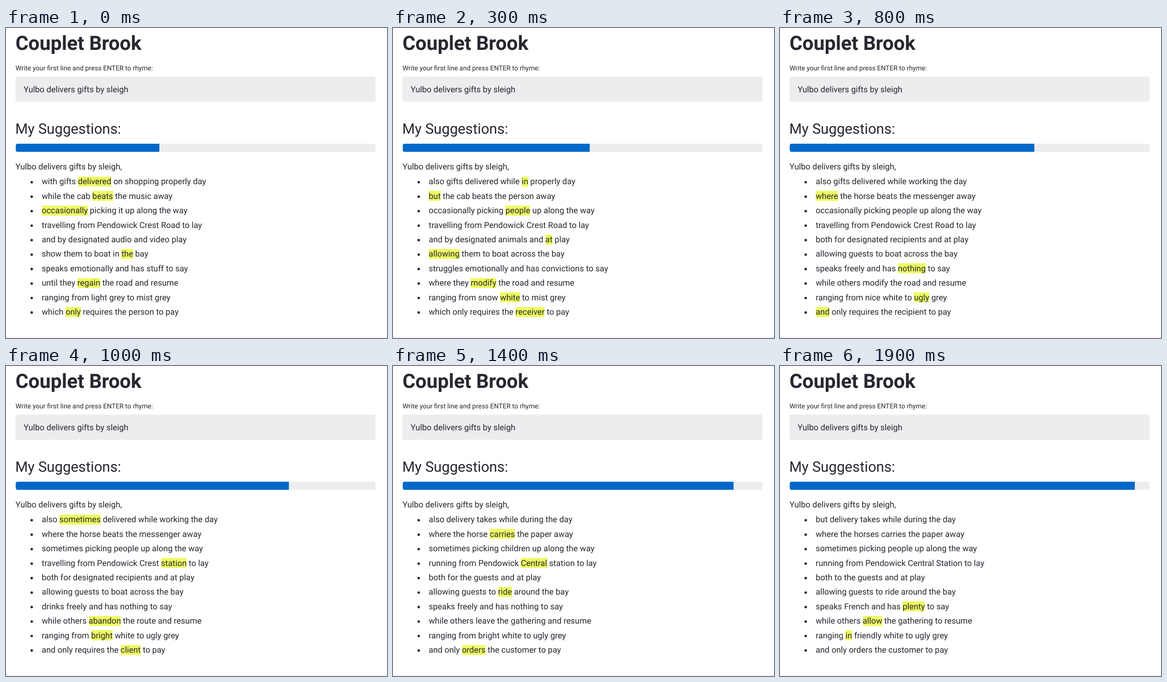
An HTML page for the animation above (2000 ms loop, 800 px wide and 651 px high).

```html
<!DOCTYPE html>
<html lang="en">
<head>
<meta charset="utf-8">
<title>Couplet Brook</title>
<style>
  html, body { margin: 0; width: 100%; height: 100%; overflow: hidden; background: #fff; }
  svg { display: block; width: 100vw; height: 100vh; }
  text { font: 17.45px Roboto, "Noto Sans", sans-serif; fill: #262730; text-rendering: geometricPrecision; }
  .title { font-size: 41.4px; font-weight: 700; }
  .label { font-size: 14px; }
  .heading { font-size: 30.2px; }
  .panel { fill: #ecedee; }
  .mark { fill: #eefc62; }
  .mark, #bar { shape-rendering: crispEdges; }
  .dot { fill: #262730; }
</style>
</head>
<body>
<svg viewBox="0 0 800 651">
  <text class="title" x="20" y="46">Couplet Brook</text>
  <text class="label" x="20" y="89">Write your first line and press ENTER to rhyme:</text>
  <rect class="panel" x="20" y="102" width="756" height="53" rx="4"/>
  <text x="37" y="134.5">Yulbo delivers gifts by sleigh</text>
  <text class="heading" x="19.5" y="222">My Suggestions:</text>
  <clipPath id="track"><rect x="20.5" y="243" width="755.5" height="17" rx="4"/></clipPath>
  <g clip-path="url(#track)">
    <rect class="panel" x="20" y="243" width="756" height="17"/>
    <rect id="bar" x="20" y="243" height="17" fill="#0068c9"/>
  </g>
  <text x="20" y="297">Yulbo delivers gifts by sleigh,</text>
  <g id="list"></g>
  <rect y="650" width="800" height="1" fill="#dcdcdd"/>
</svg>
<script>
const LOOP = 2000, STEP = 100, TRACK = 755.5;

const opening = [
  'with gifts delivered on shopping properly day',
  'while the cab beats the music away',
  'occasionally picking it up along the way',
  'travelling from Pendowick Crest Road to lay',
  'and by designated audio and video play',
  'show them to boat in the bay',
  'speaks emotionally and has stuff to say',
  'until they regain the road and resume',
  'ranging from light grey to mist grey',
  'which only requires the person to pay'
];

// Each round swaps words, written as line.word=replacement; the swapped words are highlighted.
const rounds = [
  '0.2=delivered 1.3=beats 2.0=occasionally 5.5=the 7.2=regain 9.1=only',
  '0.0=also 1.5=person 4.3=animals 5.4=across 6.4=convictions',
  '0.3=while 6.0=struggles 7.0=where 8.2=snow',
  '0.4=in 1.0=but 2.2=people 4.5=at 5.0=allowing 7.2=modify 8.3=white 9.4=receiver',
  '1.0=although 4.1=for 5.1=guests 6.0=speaks 7.0=while 8.2=nice',
  '0.5=the 1.5=messenger 4.0=both 6.1=freely 7.1=drivers 9.4=recipient',
  '0.4=working 1.2=horse 4.3=recipients 7.1=others',
  '1.0=where 6.4=nothing 8.5=ugly 9.0=and',
  '2.0=sometimes 6.0=drinks 7.4=route',
  '0.1=sometimes 3.4=station 7.2=abandon 8.2=bright 9.4=client',
  '0.1=delivery 3.0=traveling 4.2=the 5.4=around 6.0=speaks',
  '0.4=during 1.5=paper 2.2=children 4.3=guests 5.3=move 7.4=gathering 9.4=customer',
  '0.2=takes 3.0=running 7.2=leave',
  '1.3=carries 3.3=Central 5.3=ride 9.2=orders',
  '0.0=but 1.2=horses 2.2=people 3.4=Station 4.1=to 6.1=French 7.5=to 8.2=friendly',
  '6.4=plenty 7.2=allow 8.1=in'
].map(round => round.split(' ').map(swap => {
  const [place, word] = swap.split('=');
  const [line, index] = place.split('.').map(Number);
  return { line, index, word };
}));

const list = document.getElementById('list');
const bar = document.getElementById('bar');

function add(name, attrs) {
  const node = document.createElementNS('http://www.w3.org/2000/svg', name);
  for (const key in attrs) node.setAttribute(key, attrs[key]);
  return list.appendChild(node);
}

const rows = opening.map((_, i) => {
  const y = 328.4 + 30.4 * i;
  add('circle', { class: 'dot', cx: 54, cy: y - 4.6, r: 2.6 });
  return {
    mark: add('rect', { class: 'mark', y: y - 16.4, height: 21 }),
    text: add('text', { x: 75, y })
  };
});

function highlight(row, words, index) {
  let x = 0, width = 0;
  if (index !== undefined) {
    const start = words.slice(0, index).join(' ').length + (index > 0);
    x = 75 + (start ? row.text.getSubStringLength(0, start) : 0);
    width = row.text.getSubStringLength(start, words[index].length);
  }
  row.mark.setAttribute('x', x);
  row.mark.setAttribute('width', width);
}

function draw(round) {
  const lines = opening.map(line => line.split(' '));
  for (const swap of rounds.slice(0, round + 1).flat()) lines[swap.line][swap.index] = swap.word;
  rows.forEach((row, i) => {
    row.text.textContent = lines[i].join(' ');
    highlight(row, lines[i], rounds[round].find(swap => swap.line === i)?.index);
  });
  bar.setAttribute('width', TRACK * Math.min(10 + round, 24) / 25);
}

// The generator pauses for one step on two occasions.
function roundAt(time) {
  const step = Math.floor(time % LOOP / STEP);
  return Math.min(step - (step > 5) - (step > 14), rounds.length - 1);
}

const begin = performance.now();
let shown = -1;
function tick() {
  const round = roundAt(performance.now() - begin);
  if (round !== shown) draw(shown = round);
  requestAnimationFrame(tick);
}
tick();
</script>
</body>
</html>
```
